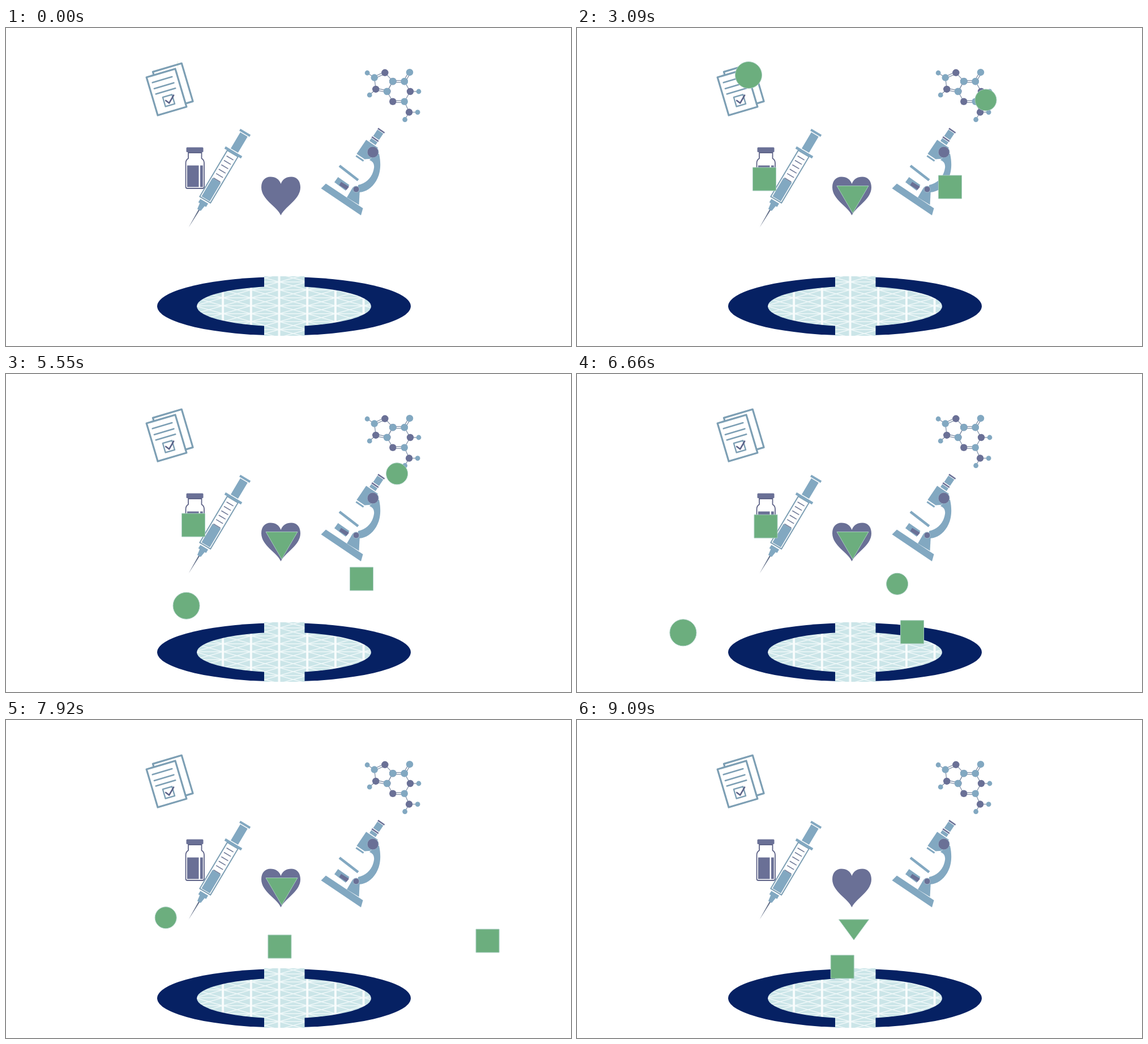
An HTML page with a canvas for the animation above (9.19 s loop, 998 by 561 pixels).

```html
<!DOCTYPE html>
<html lang="en">
<head>
<meta charset="utf-8">
<title>Shapes falling on a trampoline</title>
<style>
  html, body { margin: 0; width: 100%; height: 100%; overflow: hidden; background: #fff; }
  svg, canvas { position: absolute; left: 0; top: 0; width: 998px; height: 561px; }
  .blue { fill: #82a8c1; }
  .dark { fill: #6a7096; }
  .line { fill: #fff; stroke: #7d9fb4; stroke-linejoin: round; stroke-linecap: round; }
</style>
</head>
<body>
<svg viewBox="0 0 998 561">
  <defs>
    <pattern id="net" x="482.5" y="490" width="49.7" height="14" patternUnits="userSpaceOnUse">
      <rect width="50" height="14" fill="#cbe5e8"/>
      <path d="M0 0H50M0 14H50M0 0L49.7 14M0 14L49.7 0" fill="none" stroke="#eff8f9" stroke-width="1.6"/>
      <path d="M0 0V14M49.7 0V14" stroke="#f8fcfc" stroke-width="4"/>
    </pattern>
  </defs>

  <!-- trampoline -->
  <ellipse cx="491" cy="490.8" rx="224" ry="51.8" fill="#062163"/>
  <ellipse cx="491" cy="491" rx="154" ry="35.5" fill="url(#net)"/>
  <rect x="456" y="438" width="71.5" height="105" fill="url(#net)"/>

  <!-- documents -->
  <g class="line" stroke-width="3.2" transform="translate(283.5 113) rotate(-16.5)">
    <rect x="-13" y="-41" width="53" height="70"/>
    <rect x="-26.5" y="-35" width="53" height="70"/>
    <path d="M-19 -23H17M-19 -12H17M-19 -2H17" stroke-width="2.6"/>
    <rect x="-9" y="7" width="17" height="17" stroke-width="2.4"/>
    <path d="M-5.500 14L-1 20L10.500 9" fill="none" stroke="#5c6288" stroke-width="2.6"/>
  </g>

  <g id="molecule"></g>

  <!-- vial -->
  <rect class="dark" x="318.500" y="210.500" width="30" height="8.500" rx="1.500"/>
  <path d="M322 220V230Q317.500 233 317.500 238V280Q317.500 283 320.500 283H347Q350 283 350 280V238Q350 233 345.500 230V220Z"
        fill="#fff" stroke="#5f6488" stroke-width="1.8"/>
  <path class="dark" d="M320 242.500H340.500V280.500H320ZM343 242.500H347.800V280.500H343Z"/>

  <!-- syringe, tip at the local origin -->
  <g transform="translate(322.500 352) rotate(30.8)">
    <path d="M0 0L-1.200 -37H1.200Z" fill="#65718a"/>
    <path class="blue" d="M-3.500 -36H3.500L5 -47H8V-54H-8V-47H-5Z"/>
    <rect class="line" x="-11" y="-152" width="22" height="95" stroke-width="2"/>
    <rect class="blue" x="-8.500" y="-97" width="17" height="38"/>
    <path d="M0 -97V-145" stroke="#717b98" stroke-width="14" stroke-dasharray="1.6 7.4"/>
    <rect class="blue" x="-17" y="-156.500" width="34" height="4.500"/>
    <rect class="blue" x="-7.500" y="-191" width="15" height="33"/>
    <rect class="blue" x="-10.500" y="-196.500" width="21" height="4"/>
  </g>

  <!-- heart -->
  <path class="dark" d="M485.500 330.500C479 315 451 303 451 281C451 269 458 262.500 467 262.500C476 262.500 483 267 485.500 275C488 267 495 262.500 504 262.500C513 262.500 520 269 520 281C520 303 492 315 485.500 330.500Z"/>

  <!-- microscope -->
  <path class="blue" d="M652 222H659C664 245 660 262 651 274C642 286 632 290 621 290L622 277C637 274 648 262 650 247C651 240 648 235 642 233Z"/>
  <path class="blue" d="M565 274.500L630.500 318L627 330.500L556.500 283Z"/>
  <path class="blue" d="M602 299L612 282Q618 275 625 283L623.500 312Z"/>
  <path class="blue" d="M586.500 263L606.500 277L600 287L580 272Z"/>
  <path class="dark" d="M592 271.500L606 280L601.500 285.500L588.500 277Z"/>
  <path d="M589 243L622 268.500" stroke="#82a8c1" stroke-width="4.6"/>
  <circle class="dark" cx="618.500" cy="284.500" r="5.5" stroke="#a9c3d3"/>
  <g transform="translate(648 219) rotate(34)">
    <rect class="dark" x="-16" y="-41" width="14" height="2.5"/>
    <rect class="blue" x="-15.500" y="-37.500" width="12.5" height="13.5"/>
    <rect class="dark" x="-16.500" y="-22.500" width="14" height="2.5"/>
    <rect class="blue" x="-16" y="-19" width="13" height="6"/>
    <path class="blue" d="M-22 -11.500H3V12L-5 18.500H-22Z"/>
    <rect class="blue" x="-21" y="20.500" width="16" height="3"/>
  </g>
  <circle class="dark" cx="648" cy="219" r="10" stroke="#91aec4"/>
</svg>
<canvas id="stage" width="998" height="561"></canvas>

<script>
const LOOP = 9190;
const WHEEL = 600;

const polar = ([x, y], radius, degrees) => {
  const angle = degrees * Math.PI / 180;
  return [x + radius * Math.cos(angle), y + radius * Math.sin(angle)];
};

// A six-ring and a five-ring share an edge; side atoms point outwards.
function drawMolecule() {
  const bonds = [], atoms = [];
  const atom = ([x, y], kind, r = 6.2) =>
    atoms.push(`<circle cx="${x}" cy="${y}" r="${r}" class="${kind}"/>`);
  const bond = ([x1, y1], [x2, y2], double) => {
    const line = width => `<path d="M${x1} ${y1}L${x2} ${y2}" stroke-width="${width}" `;
    bonds.push(line(double ? 4.6 : 1.3) + 'stroke="#8291a8"/>');
    if (double) bonds.push(line(2) + 'stroke="#fff"/>');
  };
  const side = (from, center, radius, degrees, kind = 'blue', size = 4.4) => {
    const to = polar(center, radius, degrees);
    bond(from, to, size > 5 && kind === 'blue');
    atom(to, kind, size);
    return to;
  };
  const ring = (center, radius, sides, first) => {
    const points = Array.from({ length: sides }, (_, i) => polar(center, radius, first + i * 360 / sides));
    points.forEach((point, i) => {
      bond(point, points[(i + 1) % sides], i % 3 === 1);
      atom(point, i % 2 ? 'blue' : 'dark');
    });
    return points;
  };
  const fiveCenter = [666, 96], sixCenter = [693.5, 112];
  const five = ring(fiveCenter, 17.5, 5, 137);
  const six = ring(sixCenter, 20.5, 6, 0);
  [3, 4, 5].forEach(i => atom(six[i], 'blue'));

  side(five[0], fiveCenter, 32.5, 137);
  side(five[1], fiveCenter, 32.5, 211);
  side(six[0], sixCenter, 35.5, 0);
  side(six[5], sixCenter, 39, 300, 'blue', 6.2);
  const amine = side(six[1], sixCenter, 41, 63, 'dark', 6.2);
  side(amine, amine, 15, 0);
  side(amine, amine, 15, 120);
  document.getElementById('molecule').innerHTML = bonds.join('') + atoms.join('');
}

// Each shape wheels in, falls evenly to its landing point, then leaves at a steady speed.
const shapes = [
  { kind: 'circle', size: 23.5, from: [303, 83], to: [323, 502], start: 3755, land: 6065, speed: [-0.2275, -0.0766] },
  { kind: 'square', size: 20.5, from: [659, 280.5], to: [578, 492], start: 4594, land: 7095, speed: [0.33, -0.124] },
  { kind: 'circle', size: 19, from: [722, 127], to: [497, 477], start: 5272, land: 7270, speed: [-0.33, -0.197] },
  { kind: 'square', size: 20.5, from: [331, 266.5], to: [588, 491], start: 6640, land: 8800, speed: [-0.41, -0.191] },
  { kind: 'triangle', size: 28, from: [487, 302.5], to: [489, 370], start: 8720, land: 9090, speed: [0, 0] }
];

const ctx = document.getElementById('stage').getContext('2d');

function outline(kind, size, fall) {
  ctx.beginPath();
  if (kind === 'circle') ctx.arc(0, 0, size, 0, Math.PI * 2);
  else if (kind === 'square') ctx.rect(-size, -size, size * 2, size * 2);
  else {
    const halfWidth = size - fall * 1.5, halfHeight = 24 - fall * 6;
    ctx.moveTo(-halfWidth, -halfHeight);
    ctx.lineTo(halfWidth, -halfHeight);
    ctx.lineTo(0, halfHeight);
    ctx.closePath();
  }
}

function drawShape({ kind, size, from, to, start, land, speed }, index, time) {
  const shown = Math.min(1, time / WHEEL - index);
  if (shown <= 0) return;
  const fall = Math.max(0, Math.min(1, (time - start) / (land - start)));
  const away = Math.max(0, time - land);
  const [x, y] = from.map((value, i) => value + (to[i] - value) * fall + speed[i] * away);
  ctx.save();
  ctx.translate(x, y);
  if (shown < 1) {
    ctx.beginPath();
    ctx.moveTo(0, 0);
    ctx.arc(0, 0, 60, -Math.PI / 2, Math.PI * (2 * shown - 0.5));
    ctx.clip();
  }
  outline(kind, size, fall);
  ctx.fill();
  ctx.stroke();
  ctx.restore();
}

function draw(time) {
  ctx.clearRect(0, 0, 998, 561);
  ctx.save();
  ctx.beginPath();
  ctx.rect(3, 0, 995, 561);
  ctx.clip();
  ctx.fillStyle = '#6cae7e';
  ctx.strokeStyle = '#a4cbbd';
  ctx.lineWidth = 1;
  shapes.forEach((shape, index) => drawShape(shape, index, time));
  ctx.restore();
}

const began = performance.now();
function tick() {
  draw((performance.now() - began) % LOOP);
  requestAnimationFrame(tick);
}
drawMolecule();
tick();
</script>
</body>
</html>
```
